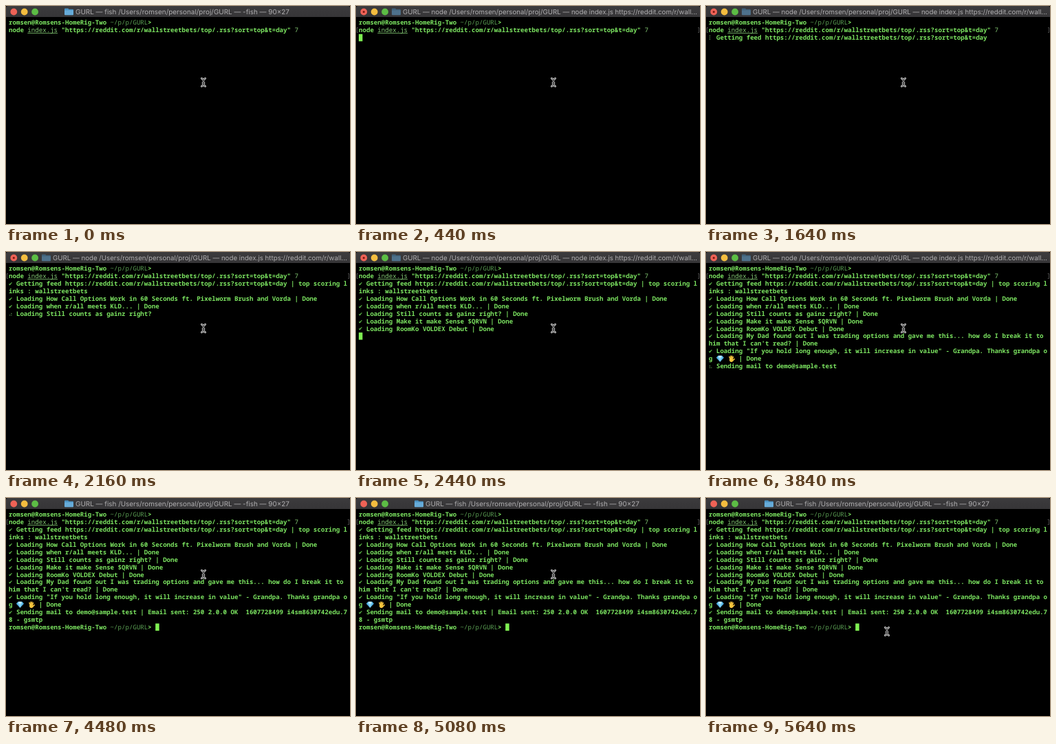
Recreate the animation shown at these times as an HTML page with a canvas. Size 500x317 px, loop 5.68 s.

```html
<!DOCTYPE html>
<html lang="en">
<head>
<meta charset="utf-8">
<title>Terminal</title>
<style>
  html, body { margin: 0; width: 100%; height: 100%; overflow: hidden; background: #000; }
  canvas { display: block; width: 500px; height: 317px; }
</style>
</head>
<body>
<canvas id="stage"></canvas>
<script>
const W = 500, H = 317, LOOP = 5680;
const canvas = document.getElementById('stage');
const ctx = canvas.getContext('2d');
const dpr = window.devicePixelRatio || 1;
canvas.width = W * dpr;
canvas.height = H * dpr;

const COLS = 90, CELL = 5.467, LINE = 10.9, LEFT = 4, TOP = 19;
const MONO = '"Noto Sans Mono", "DejaVu Sans Mono", monospace';
const BOLD = '600 9.11px ' + MONO;
const REGULAR = '400 9.11px ' + MONO;
const GREEN = '#7be360', SOFT = '#84cb74', DIM = '#5ba054', BLOCK = '#7ff052';

const USER = 'romsen@Romsens-HomeRig-Two';
const URL_TEXT = 'https://reddit.com/r/wallstreetbets/top/.rss?sort=top&t=day';
const HOME = '/Users/romsen/personal/proj/GURL';
const RUN = 40, EXIT = 4200;

// Each task spins from `from` to `to`, then shows its result.
const task = (row, from, to, text, result) => ({ row, from, to, text, result });
const load = (row, from, to, title) => task(row, from, to, 'Loading ' + title, 'Done');
const tasks = [
  task(2, 640, 1880, 'Getting feed ' + URL_TEXT, 'top scoring links : wallstreetbets'),
  load(4, 1920, 2040, 'How Call Options Work in 60 Seconds ft. Pixelworm Brush and Vorda'),
  load(5, 2040, 2120, 'when r/all meets KLD...'),
  load(6, 2120, 2240, 'Still counts as gainz right?'),
  load(7, 2240, 2320, 'Make it make Sense $QRVN'),
  load(8, 2320, 2400, 'RoomKo VOLDEX Debut'),
  load(9, 2480, 2640, 'My Dad found out I was trading options and gave me this... how do I break it to him that I can\'t read?'),
  load(11, 2640, 2800, '"If you hold long enough, it will increase in value" - Grandpa. Thanks grandpa og 💎 ✋'),
  task(13, 2880, 4160, 'Sending mail to demo@sample.test',
    'Email sent: 250 2.0.0 OK  1607728499 i4sm8630742edu.78 - gsmtp')
];
const nextRow = [4, 5, 6, 7, 8, 9, 11, 13, 15];

const cellX = col => LEFT + col * CELL;
const rowY = row => TOP + row * LINE;

function disc(x, y, r, color) {
  ctx.fillStyle = color;
  ctx.beginPath();
  ctx.arc(x, y, r, 0, 7);
  ctx.fill();
}

function poly(points, color) {
  ctx.fillStyle = color;
  ctx.beginPath();
  points.forEach(([x, y]) => ctx.lineTo(x, y));
  ctx.fill();
}

function gem(x, y) {
  poly([[x + 2.5, y], [x + 8.5, y], [x + 11, y + 3], [x + 5.5, y + 9], [x, y + 3]], '#55b5e8');
  poly([[x + 3.5, y], [x + 7.5, y], [x + 8, y + 3], [x + 3, y + 3]], '#c4ecfb');
  poly([[x + 3.2, y + 3], [x + 7.8, y + 3], [x + 5.5, y + 9]], '#8ad4f4');
}

function hand(x, y) {
  ctx.strokeStyle = '#f6c53d';
  ctx.lineCap = 'round';
  ctx.lineWidth = 1.5;
  ctx.beginPath();
  [[2.6, 1.9], [4.5, .7], [6.4, .7], [8.2, 2]].forEach(([dx, dy]) => {
    ctx.moveTo(x + dx, y + dy);
    ctx.lineTo(x + 3.4 + dx * .4, y + 6);
  });
  ctx.moveTo(x + 10, y + 5);
  ctx.lineTo(x + 7.5, y + 7.5);
  ctx.stroke();
  disc(x + 5.5, y + 6.6, 2.8, '#f6c53d');
}

// Writes text on the cell grid, wrapping at the last column.
function put(col, row, text, color = GREEN, font = BOLD) {
  for (const ch of text) {
    if (col >= COLS) { col = 0; row++; }
    const x = cellX(col), y = rowY(row);
    if (ch === '💎') { gem(x, y + 1); col += 2; continue; }
    if (ch === '✋') { hand(x, y + .7); col += 2; continue; }
    ctx.fillStyle = color;
    ctx.font = font;
    if (ch !== ' ') ctx.fillText(ch, x, y + 8.3);
    col++;
  }
}

function check(row) {
  ctx.fillStyle = '#67cf50';
  ctx.font = '7.5px "DejaVu Sans", sans-serif';
  ctx.fillText('✔', LEFT - .4, rowY(row) + 8.2);
}

// Braille dots as bits: left column 1, 2, 4; right column 8, 16, 32.
const SPIN = [11, 25, 57, 56, 60, 52, 38, 39, 7, 15];
function spinner(row, t) {
  const bits = SPIN[Math.floor(t / 80 + 8) % 10];
  for (let i = 0; i < 6; i++) {
    if (bits >> i & 1) disc(LEFT + 1.6 + (i > 2) * 2.3, rowY(row) + 2.6 + i % 3 * 2.4, .62, '#74bd66');
  }
}

function block(col, row) {
  ctx.fillStyle = BLOCK;
  ctx.fillRect(cellX(col), rowY(row), CELL, LINE - .4);
}

function prompt(row) {
  put(0, row, USER);
  put(27, row, '~/p/p/GURL', DIM, REGULAR);
  put(37, row, '>');
}

function command() {
  put(0, 1, 'node');
  put(5, 1, 'index.js', SOFT, REGULAR);
  ctx.fillStyle = SOFT;
  ctx.fillRect(cellX(5), rowY(1) + 9.2, CELL * 8, .8);
  put(14, 1, '"' + URL_TEXT + '"');
  put(76, 1, '7', SOFT, REGULAR);
}

function marks() {
  ctx.strokeStyle = '#666';
  ctx.lineWidth = .7;
  ctx.beginPath();
  for (const [x, d] of [[1.5, 1.5], [498.5, -1.5]]) {
    ctx.moveTo(x + d, 31.5);
    ctx.lineTo(x, 31.5);
    ctx.lineTo(x, 38.5);
    ctx.lineTo(x + d, 38.5);
  }
  ctx.stroke();
}

function folder(x, back, front) {
  ctx.fillStyle = back;
  ctx.beginPath();
  ctx.roundRect(x, 3.6, 6, 4, 1);
  ctx.roundRect(x, 4.8, 13, 7, 1);
  ctx.fill();
  ctx.fillStyle = front;
  ctx.beginPath();
  ctx.roundRect(x, 6.2, 13, 7, 1);
  ctx.fill();
}

function caption(text, x, size) {
  ctx.font = size + 'px Inter, "Open Sans", sans-serif';
  ctx.fillStyle = '#b0afb1';
  ctx.fillText(text, x, 12.2);
}

function titleBar(busy) {
  const shade = ctx.createLinearGradient(0, 0, 0, 16);
  shade.addColorStop(0, '#3c3b3d');
  shade.addColorStop(1, '#363537');
  ctx.fillStyle = shade;
  ctx.beginPath();
  ctx.roundRect(0, 0, W, 16, [3, 3, 0, 0]);
  ctx.fill();
  ['#ee6256', '#f4bd3f', '#5cbd45'].forEach((color, i) => disc(11.3 + i * 15.4, 8.5, 4.9, color));
  if (busy) {
    disc(11.3, 8.5, 1.5, '#7a1712');
    folder(52, '#41627a', '#4e718b');
    caption('GURL — node ' + HOME + ' — node index.js https://reddit.com/r/wall...', 68, 9.72);
  } else {
    folder(85, '#4b93c4', '#66abd8');
    caption('GURL — fish ' + HOME + ' — -fish — 90×27', 101, 9.92);
  }
}

function pointer(t) {
  const p = Math.min(1, Math.max(0, (t - 5480) / 160));
  const k = p * p * (3 - 2 * p);
  ctx.save();
  ctx.translate(287 - 24 * k, 111 + 83 * k);
  ctx.lineCap = 'round';
  const shape = new Path2D('M-2.6-5.8L0-3.4L2.6-5.8M0-3.4V3.4M-2.6 5.8L0 3.4L2.6 5.8M-1 1H1');
  [['#dedede', 2.7], ['#0c0c0c', 1]].forEach(([color, width]) => {
    ctx.strokeStyle = color;
    ctx.lineWidth = width;
    ctx.stroke(shape);
  });
  ctx.restore();
}

function output(t) {
  let row = 2, spinning = false;
  tasks.forEach((job, i) => {
    if (t < job.from) return;
    if (t < job.to) {
      spinning = true;
      spinner(job.row, t);
      put(2, job.row, job.text);
    } else {
      check(job.row);
      put(2, job.row, job.text + ' | ' + job.result);
      row = nextRow[i];
    }
  });
  if (t >= EXIT) {
    prompt(15);
    block(39, 15);
  } else if (!spinning) {
    block(0, row);
  }
}

function draw(t) {
  ctx.setTransform(dpr, 0, 0, dpr, 0, 0);
  ctx.textRendering = 'geometricPrecision';
  ctx.fillStyle = '#000';
  ctx.fillRect(0, 0, W, H);
  titleBar(t >= RUN && t < EXIT);
  prompt(0);
  command();
  if (t >= RUN) {
    marks();
    output(t);
  }
  pointer(t);
}

const start = performance.now();
function tick() {
  const t = (performance.now() - start) % LOOP;
  draw(Math.floor(t / 40) * 40);
  requestAnimationFrame(tick);
}
tick();
</script>
</body>
</html>
```
